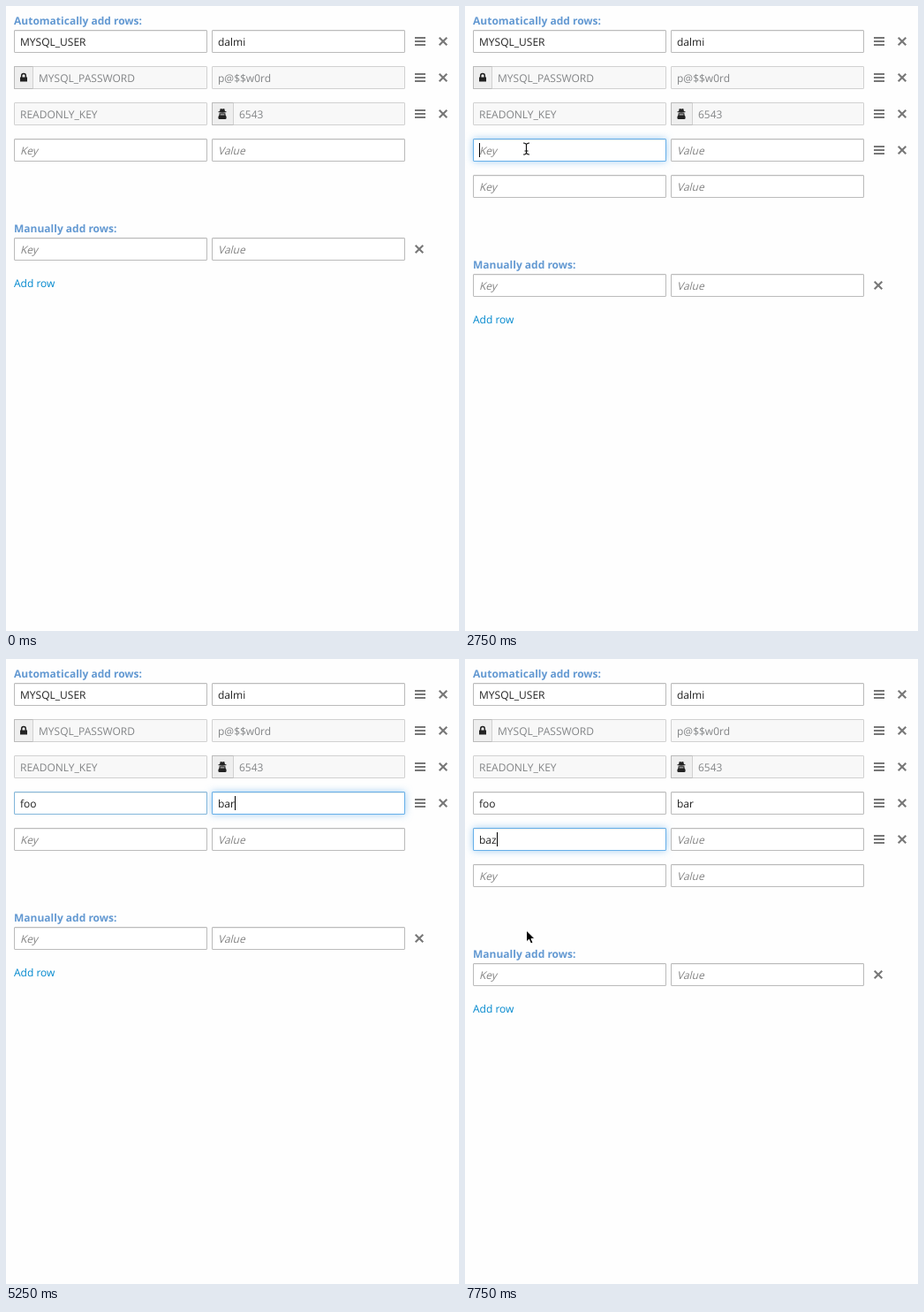
Write an HTML page that moves like this. It is 513 by 707 pixels and loops after 8 s.

```html
<!DOCTYPE html>
<html lang="en">
<head>
<meta charset="utf-8">
<style>
html, body { margin: 0; width: 100%; height: 100%; overflow: hidden; background: #fefefe; }
#stage { position: relative; width: 513px; height: 707px; overflow: hidden; color: #222;
  font: 12px/17px "Open Sans", sans-serif; text-rendering: geometricPrecision; }
#stage > * { position: absolute; white-space: pre; }
.label { left: 9px; font-weight: 700; color: #6399d2; }
.link { left: 9px; color: #0088ce; }
.field { box-sizing: border-box; width: 219px; height: 26px; padding: 4px 6px; background: #fff;
  border: 1px solid #bbb; border-radius: 1px; box-shadow: inset 0 1px 1px rgba(0,0,0,.075); }
.disabled { background: #f8f8f8; border-color: #d1d1d1; color: #838587; box-shadow: none; }
.blurred { border-color: #82b6da; }
.focus { border-color: #66afe9; box-shadow: inset 0 1px 1px rgba(0,0,0,.075), 0 0 8px rgba(102,175,233,.6); }
/* Slanted upright letters, wider than the true italic */
.hint { display: inline-block; transform: skewX(-14deg); transform-origin: 0 13px; color: #858585; }
.caret { display: inline-block; width: 1px; height: 16px; margin-right: -1px; background: #000; vertical-align: top; }
.addon { box-sizing: border-box; height: 26px; background: #eee; border: 1px solid #bbb;
  border-right-color: #d1d1d1; border-radius: 1px 0 0 1px; }
svg { left: 0; top: 0; overflow: visible; }
</style>
</head>
<body>
<div id="stage"></div>
<script>
const stage = document.getElementById('stage');
const STEP = 250, LOOP = 8000, ROW = 41;
const KEY_X = 9, VALUE_X = 233;
const CARET = '<span class="caret"></span>';

const text = (cls, y, s) => `<div class="${cls}" style="top:${y}px">${s}</div>`;
const icon = (x, y, body) => `<svg width="1" height="1"><g transform="translate(${x} ${y})">${body}</g></svg>`;
const bars = y => icon(469, y + 13, '<path d="M-6-4H6M-6 0H6M-6 4H6" stroke="#777" stroke-width="2"/>');
const cross = (x, y) => icon(x, y + 13, '<path d="M-4.3-4.3L4.3 4.3M4.3-4.3L-4.3 4.3" stroke="#777" stroke-width="2.1"/>');
const tools = y => bars(y) + cross(495, y);

function field(x, y, value, { hint = '', cls = '', caret = false, indent = 0 } = {}) {
  const content = value || `<span class="hint">${hint}</span>`;
  const inner = !caret ? content : value ? content + CARET : CARET + content;
  return `<div class="field ${cls}" style="left:${x}px;top:${y}px;padding-left:${6 + indent}px">${inner}</div>`;
}
const keyField = (y, value, opts) => field(KEY_X, y, value, { hint: 'Key', ...opts });
const valueField = (y, value, opts) => field(VALUE_X, y, value, { hint: 'Value', ...opts });
const addon = (x, y, w) => `<div class="addon" style="left:${x}px;top:${y}px;width:${w}px"></div>`;

const LOCK = '<path d="M-4-.5H4V4.5H-4Z" fill="#222"/><path d="M-2.3 0V-2.2A2.3 2.3 0 0 1 2.3-2.2V0" fill="none" stroke="#222" stroke-width="1.5"/>';
const SPY = '<path d="M-5-2Q-4-2.9-3-3L-2.2-6Q0-5.2 2.2-6L3-3Q4-2.9 5-2Q0-.6-5-2Z" fill="#222"/>' +
  '<path d="M-3.4-.8H3.4L3.6 1.4Q5 2.4 4.6 5Q4.4 6 3.4 6H-3.4Q-4.4 6-4.6 5Q-5 2.4-3.6 1.4Z" fill="#222"/>' +
  '<path d="M-2.4.9H2.4" stroke="#eee" stroke-width=".9"/>';

const fixedRows =
  text('label', 8, 'Automatically add rows:') +
  keyField(27, 'MYSQL_USER') + valueField(27, 'dalmi') + tools(27) +
  keyField(68, 'MYSQL_PASSWORD', { cls: 'disabled', indent: 21 }) + addon(KEY_X, 68, 22) + icon(20, 81, LOCK) +
  valueField(68, 'p@$$w0rd', { cls: 'disabled' }) + tools(68) +
  keyField(109, 'READONLY_KEY', { cls: 'disabled' }) +
  valueField(109, '6543', { cls: 'disabled', indent: 24 }) + addon(VALUE_X, 109, 25) + icon(245, 122, SPY) + tools(109);

const ARROW = '<path d="M.5 0V13L3.5 10.2 5.6 15 8 14 6 9.4H10Z" fill="#000" stroke="#fff"/>';
const BEAM_PATH = 'M-3.5-6.5Q0-6.5 0-4Q0-6.5 3.5-6.5M0-4.5V4.5M-3.5 6.5Q0 6.5 0 4Q0 6.5 3.5 6.5M-2 2.5H2';
const BEAM = `<g fill="none"><path d="${BEAM_PATH}" stroke="#fff" stroke-width="2.4"/><path d="${BEAM_PATH}" stroke="#111" stroke-width="1.2"/></g>`;

// Mouse pointer at step k: arrow, text beam or hidden while typing
function pointer(k) {
  if (k < 4) return '';
  if (k <= 8) {
    const left = ((8 - k) / 4) ** 1.3;
    return icon(119 + 297 * left, 163 - 21 * left, ARROW);
  }
  if (k < 16) {
    const left = Math.max(0, 11 - k);
    return icon(69.5 + 16 * left, 161.5 + left, BEAM);
  }
  if (k < 28) return '';
  if (k === 31) return icon(69, 307, ARROW);
  return icon(70.5, [161.5, 174.5, 241.5][k - 28], BEAM);
}

const CLICK = 11, TYPE_KEY = 16, TO_VALUE = 19, TYPE_VALUE = 21, NEXT_ROW = 23;
const typed = (word, k, start) => word.slice(0, Math.max(0, k - start + 1));

function scene(k) {
  const rows = k < CLICK ? 4 : k < NEXT_ROW ? 5 : 6;
  const caret = !(k === 14 || k === 15 || k === 28 || k === 29);
  const focus = on => on ? { cls: 'focus', caret } : {};
  let html = fixedRows;

  const onKey = k >= CLICK && k < TO_VALUE;
  const fading = k >= TO_VALUE && k < 31;
  html += keyField(150, typed('foo', k, TYPE_KEY), fading ? { cls: 'blurred' } : focus(onKey));
  html += valueField(150, k >= TYPE_VALUE ? 'bar' : '', focus(k >= TO_VALUE && k < NEXT_ROW));
  if (rows > 4) html += tools(150) + keyField(191, typed('baz', k, NEXT_ROW + 1), focus(rows > 5)) + valueField(191, '');
  if (rows > 5) html += tools(191) + keyField(232, '') + valueField(232, '');

  const y = 262 + ROW * (rows - 4);
  html += text('label', y - 19, 'Manually add rows:') + keyField(y, '') + valueField(y, '') + cross(468, y);
  return html + text('link', y + 43, 'Add row') + pointer(k);
}

let shown = -1;
function tick() {
  const k = Math.floor(performance.now() % LOOP / STEP);
  if (k !== shown) stage.innerHTML = scene(shown = k);
  requestAnimationFrame(tick);
}
tick();
</script>
</body>
</html>
```
